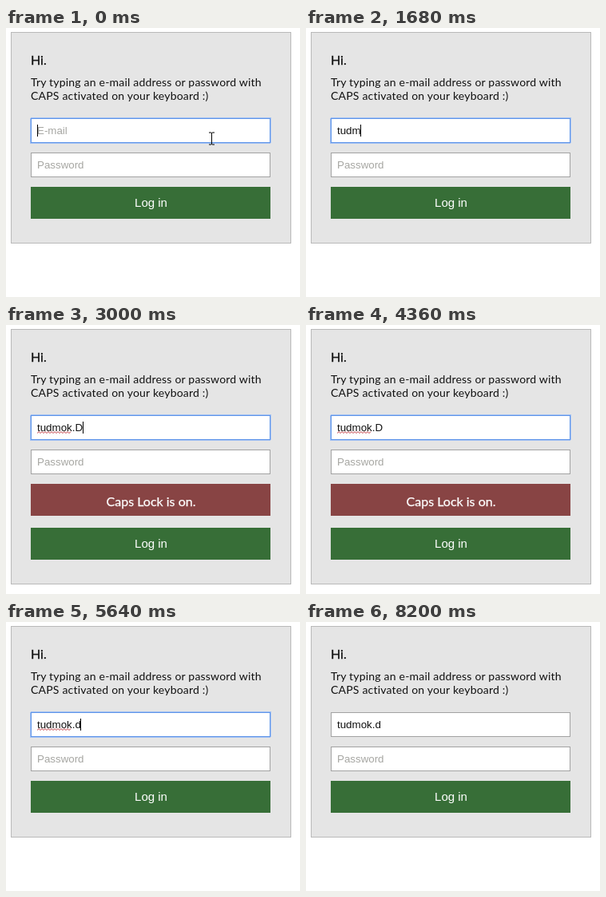
An HTML page that plays this animation: 368x337 px, repeating every 8.24 s.

```html
<!DOCTYPE html>
<html lang="en">
<head>
<meta charset="utf-8">
<title>Caps Lock warning</title>
<style>
  html, body { margin: 0; width: 100%; height: 100%; overflow: hidden; background: #fff; }
  svg { display: block; }
  rect { shape-rendering: crispEdges; }
  text { font: 14px Lato, sans-serif; fill: #111; }
  .intro { letter-spacing: .2px; }
  .medium { font-size: 16px; stroke: #111; stroke-width: .35px; }
  .field { fill: #fff; stroke: #a2a2a2; }
  .input { font: 13.333px "Liberation Sans", Arial, sans-serif; }
  .hint { fill: #a6a6a2; }
  .label { fill: #fff; text-anchor: middle; }
  .login { font: 15px "Liberation Sans", Arial, sans-serif; }
  .caps { stroke: #fff; stroke-width: .25px; }
  .line { fill: none; stroke: #000; }
</style>
</head>
<body>
<svg width="368" height="337" viewBox="0 0 368 337">
  <rect id="card" x="6.5" y="5.5" width="350" height="264" fill="#e5e5e5" stroke="#b9b9b9"/>
  <text class="medium" x="31" y="46">Hi.</text>
  <text class="intro" x="31" y="73">Try typing an e-mail address or password with</text>
  <text class="intro" x="31" y="90">CAPS activated on your keyboard :)</text>

  <rect class="field" x="31.5" y="113.5" width="299" height="30"/>
  <g id="focus" fill="none">
    <rect x="30.5" y="112.5" width="301" height="32" rx="1.5" stroke="#a3c1f3"/>
    <rect x="31.5" y="113.5" width="299" height="30" stroke="#5f95e8"/>
  </g>
  <text id="hint" class="input hint" x="39" y="133">E-mail</text>
  <text id="typed" class="input" x="39" y="133"></text>
  <path id="squiggle" class="line" style="stroke:#c4474d"/>
  <rect id="caret" y="121" width="1" height="15"/>

  <rect class="field" x="31.5" y="156.5" width="299" height="30"/>
  <text class="input hint" x="39" y="176">Password</text>

  <g id="warning">
    <rect x="31" y="199" width="300" height="40" fill="#884444"/>
    <text class="label medium caps" x="181.5" y="227">Caps Lock is on.</text>
  </g>
  <g id="button">
    <rect x="31" y="199" width="300" height="40" fill="#376e37"/>
    <text class="label login" x="181.5" y="224">Log in</text>
  </g>

  <path id="beam" class="line" d="M-3.5-7.5h3l.5.5l.5-.5h3M-3.5 7.5h3l.5-.5l.5.5h3M0-7V7"/>
  <path id="arrow" d="M.5.5v16l3.7-3.5l2.7 6l2.4-1l-2.6-5.8h5z" fill="#fff" stroke="#000"/>
</svg>
<script>
const LOOP = 8240, CAPS_ON = 3000, CAPS_OFF = 5640, BLUR = 8200;
const user = "tudmok";

// [time, content of the e-mail field]
const typing = [
  [0, ""],
  ...[1280, 1480, 1560, 1680, 1760, 1840].map((at, i) => [at, user.slice(0, i + 1)]),
  [2160, user + "."], [3000, user + ".D"], [4480, user + "."],
  [4560, user + ".D"], [5280, user + "."], [5640, user + ".d"],
];
const caretOff = [
  [440, 840], [2600, 3000], [3480, 3920], [4360, 4480],
  [5000, 5280], [6080, 6520], [7000, 7440], [7880, LOOP],
];
// [time, x, y] of the mouse pointer, which leaves the field at the end
const pointer = [[0, 257.5, 138.5], [280, 269.5, 138.5], [320, 292.5, 139.5], [360, 317.5, 140.5], [400, 333, 141]];

const $ = id => document.getElementById(id);
const show = (id, visible) => $(id).setAttribute("display", visible ? "inline" : "none");
const latest = (steps, t) => steps.findLast(([at]) => at <= t);

let wave = "M39 135.5";
for (let x = 41; x <= 81; x += 2) wave += `L${x} ${x % 4 === 1 ? 133.7 : 135.5}`;
$("squiggle").setAttribute("d", wave);

function draw(t) {
  const text = latest(typing, t)[1];
  const typed = $("typed");
  if (typed.textContent !== text) typed.textContent = text;
  show("hint", !text);

  const focused = t < BLUR;
  show("focus", focused);
  show("squiggle", focused && t >= 2160);
  show("caret", focused && !caretOff.some(([from, to]) => t >= from && t < to));
  $("caret").setAttribute("x", 39 + Math.floor(text ? typed.getComputedTextLength() : 0));

  const caps = t >= CAPS_ON && t < CAPS_OFF;
  show("warning", caps);
  $("card").setAttribute("height", caps ? 319 : 264);
  $("button").setAttribute("transform", `translate(0 ${caps ? 55 : 0})`);

  const [, x, y] = latest(pointer, t);
  show("beam", t < 400);
  show("arrow", t >= 400 && t < 440);
  for (const id of ["beam", "arrow"]) $(id).setAttribute("transform", `translate(${x} ${y})`);
}

function tick() {
  draw(performance.now() % LOOP);
  requestAnimationFrame(tick);
}
tick();
</script>
</body>
</html>
```
